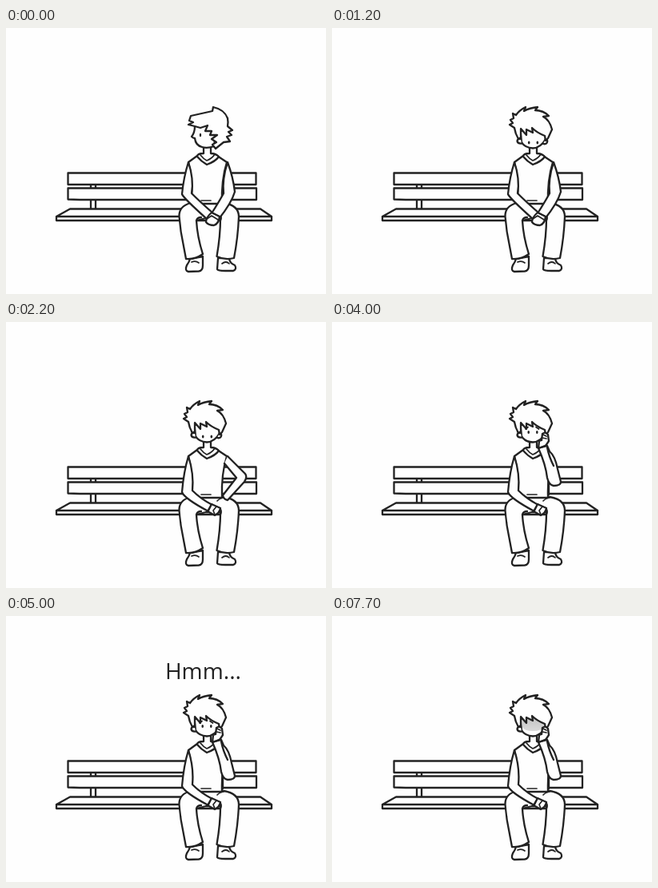
These frames come from a looping animation (400 by 333 pixels, 8 s). An HTML page:

```html
<!DOCTYPE html>
<html lang="en">
<head>
<meta charset="utf-8">
<title>Waiting on a bench</title>
<style>
html, body { margin: 0; width: 100%; height: 100%; overflow: hidden; background: #fefefe; }
svg { display: block; width: 100%; height: 100%; }
.art { fill: #fefefe; stroke: #222; stroke-width: 2.3; stroke-linejoin: round; stroke-linecap: round; }
.line { fill: none; }
.thin { fill: none; stroke-width: 1.7; }
.ink { fill: #222; stroke: none; }
text { font: 28px "Open Sans", sans-serif; fill: #222; stroke: none; text-anchor: middle; }
</style>
</head>
<body>
<svg viewBox="0 0 400 333">
  <defs>
    <linearGradient id="gloom" x1="0" y1="0" x2="0" y2="1">
      <stop offset="0" stop-color="#c2c2c2"/>
      <stop offset="1" stop-color="#dadada"/>
    </linearGradient>
    <g id="eyes"><ellipse cx="-5.300" rx="1.300" ry="2.100"/><ellipse cx="5.300" rx="1.300" ry="2.100"/></g>
  </defs>
  <g class="art">
    <g id="bench">
      <path d="M106 194V228H112V194"/>
      <path d="M77.500 181.500H312.500V196H77.500ZM77.500 200.500H313V215H92L77.500 214.500Z"/>
      <path d="M63 236L80 226.500H318L332 236V241H63ZM63 236H332"/>
    </g>

    <g id="body">
      <path d="M230 289Q229 293 226 297Q223 304 228 305L241 304.500Q246 304 246 297V286ZM265 288L264 302Q265 304 274 304H284Q289 302 286 297Q279 294 279 288Z"/>
      <path class="thin" d="M232 293Q237 291 241 294M270 295Q275 291 279 295"/>
      <path d="M231 219Q216 223 216.500 236Q218 255 222 273L225 289Q236 290 246 283Q239 261 238 241L250 238H268Q268 260 263.500 286Q274 291 285 288Q290 262 291 236Q291 222 272 219Z"/>
      <path class="line" d="M238 241Q239 237 244 237M268 241Q270 237 267 233"/>
      <path d="M239 160L228 168Q234 191 232 214L236 220H270Q269 190 276 168L264 160Z"/>
      <path class="thin" d="M244 216H256"/>
      <path d="M247 148V157Q239 157 239 161Q244 167 251 171Q262 167 266 161Q262 157 256 157V148"/>
      <path class="thin" d="M243 159Q247 164 251 166Q258 163 261 158"/>
    </g>

    <g data-show="0 2200">
      <path d="M228 168Q222 187 220 208Q222 213 251 239L259 232Q243 218 232 207Q235 189 228 168Z"/>
      <path d="M277 168Q284 187 286 205Q282 219 266 239L257 232Q266 218 272 207Q270 190 277 168Z"/>
      <path d="M257 231L267 236Q266 245 260 247Q253 247 250 243Q250 237 257 231Z"/>
      <path class="thin" d="M251 239L257 235L265 240M257 231L267 236"/>
    </g>

    <g data-show="2200 8000">
      <path d="M228 168Q222 188 220 213Q223 221 253 237L258 229Q244 222 233 211Q235 190 228 168Z"/>
      <path d="M257 228L268 233Q267 239 261 242L252 237Z"/>
      <path class="thin" d="M257 228L253 237M263 231L259 236L261 241M264 224Q268 220 272 220"/>
    </g>
    <g data-show="2200 2500">
      <path d="M277 168L299 190Q302 194 298 200L277 223Q272 222 271 217L288 195L273 177"/>
    </g>

    <g data-show="0 700">
      <path d="M236 123Q236 131 232 136Q234 138 236 138Q237 147 245 149Q252 151 260 148L264 120Z"/>
      <path d="M228 121L234 118L229 116L231 110L258 104L259 99Q273 102 277 113Q278 118 277 123L283 128L278 130L282 134L276 136L280 142L272 143L262 151L258 146L263 143L257 139L264 134L255 134L257 129L249 129L252 122L243 125L236 123Z"/>
      <ellipse class="ink" cx="243" cy="134" rx="1.200" ry="2.300"/>
    </g>

    <g data-show="700 8000">
      <path d="M235 124L237 143Q241 150 251 150.500Q261 150 267 139V125Z"/>
      <path data-show="7700 8000" fill="url(#gloom)" stroke="none" d="M237 126H266V138Q262 144 251 144Q240 144 238 139Z"/>
      <path d="M236 139Q232 138 231.500 141.500Q232 145 237 144.500"/>
      <path data-show="700 2500" d="M267 139Q270 140 269 143Q268 146 264 145"/>
      <path d="M233 139Q229 132 228 125L222 121L226 119L223 115L227 113L226 107L230 109Q234 103 242 99L240 104Q247 100 257 99L254 103Q264 103 271 110L264 111Q272 115 275 127L270 138L267 141L266 135Q256 131 250 125L251 131L243 127L243 134L236 126V137Z"/>
      <g class="ink">
        <use href="#eyes" x="251.500" y="140.500" data-show="700 1200"/>
        <use href="#eyes" x="251.500" y="143.500" data-show="1200 2500"/>
        <use href="#eyes" x="251" y="138" data-show="2500 7700"/>
      </g>
      <path class="thin" data-show="4000 7700" d="M242 134L245 131.500M255 131.500L258.500 134"/>
    </g>

    <g data-show="2500 8000">
      <path d="M272 162Q279 168 282 184L286 200Q286 205 277 205Q271 204 269 195Q267 178 258 158L269 155L272 162Z"/>
      <path class="line" d="M269 157Q271 168 277 180M271 202V216"/>
      <path d="M258 158L259 149L262 148L263 140Q267 137 270 141L271 149L267 155Z"/>
      <path class="thin" d="M258 158L268 154M264 141L268 143M263 145L268 146"/>
    </g>

    <text data-show="5000 6500" x="246.500" y="79">Hmm...</text>
  </g>
</svg>
<script>
const LOOP = 8000;
const parts = [...document.querySelectorAll("[data-show]")].map(element => {
  const [start, end] = element.dataset.show.split(" ").map(Number);
  return { element, start, end };
});
const origin = performance.now();

function draw() {
  const time = (performance.now() - origin) % LOOP;
  for (const { element, start, end } of parts) {
    element.style.display = time >= start && time < end ? "" : "none";
  }
  requestAnimationFrame(draw);
}
draw();
</script>
</body>
</html>
```
